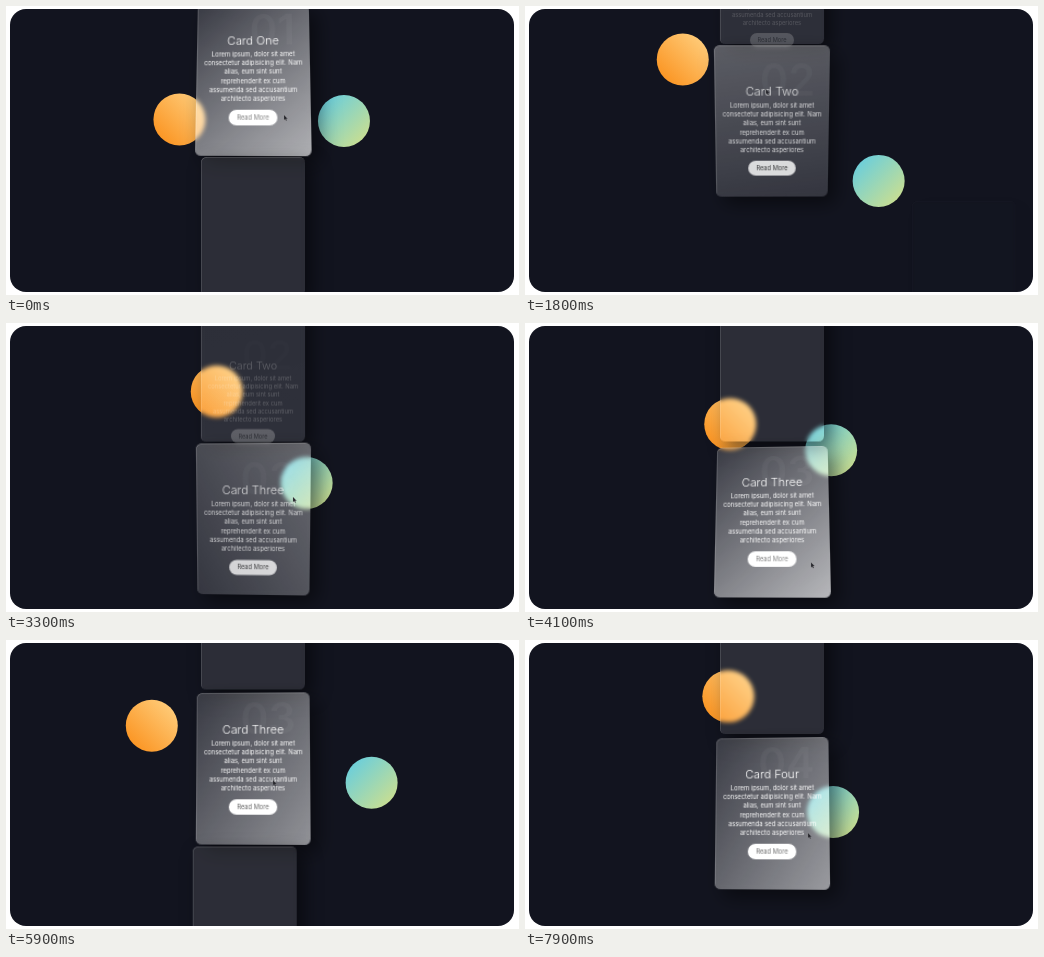
These frames come from a looping animation (513x289 px, 8 s). An HTML page:

```html
<!DOCTYPE html>
<html lang="en">
<head>
<meta charset="utf-8">
<title>Glass cards</title>
<style>
html, body { margin: 0; width: 100%; height: 100%; overflow: hidden; background: #12141f; }
#world { position: absolute; left: 0; top: 0; width: 513px; height: 289px; overflow: hidden; background: #12141f; }
#frame {
  position: absolute; left: 3.6px; top: 2.6px; width: 504.8px; height: 283.8px;
  border-radius: 16px; box-shadow: 0 0 0 40px #fff;
}
.ball { position: absolute; left: -26px; top: -26px; width: 52px; height: 52px; border-radius: 50%; }
#orange { background: linear-gradient(45deg, #fb9726 15%, #ffd080 95%); }
#green { background: linear-gradient(135deg, #6fcfd8 15%, #c8de92 88%); }
.card {
  position: absolute; left: 194.5px; top: -69px; width: 104px; height: 139px;
  border-radius: 5.5px; background: rgba(255, 255, 255, .11);
  box-shadow: 7px 7px 18px rgba(0, 0, 0, .5), inset .5px .5px 0 rgba(255, 255, 255, .25);
  backdrop-filter: blur(2px);
  font-family: Inter, "Open Sans", sans-serif; color: #fff; text-align: center;
}
.content, .glare { position: absolute; inset: 0; border-radius: 5.5px; }
.content > * { position: absolute; left: -10px; right: -10px; margin: 0; white-space: nowrap; }
.content .num {
  top: 2px; left: auto; right: 13px;
  font-size: 39px; line-height: 44px; font-weight: 600; color: rgba(255, 255, 255, .04);
}
h3 { top: 25.7px; font-size: 10.8px; line-height: 18px; font-weight: 350; }
p { top: 42.6px; font-size: 5.85px; line-height: 8.35px; }
.content .btn {
  top: 97.5px; left: 30.2px; right: 30.2px; height: 14.4px; border-radius: 8px;
  background: #fff; color: #222; font-size: 5.7px; line-height: 14.4px;
}
.glare { overflow: hidden; }
.glare i {
  position: absolute; left: -52px; top: -35px; width: 208px; height: 208px;
  background: linear-gradient(0deg, rgba(255, 255, 255, 0), #fff);
}
#mouse { position: absolute; left: 0; top: 0; width: 5px; height: 7px; overflow: visible; }
</style>
</head>
<body>
<div id="world">
  <div class="ball" id="orange"></div>
  <div class="ball" id="green"></div>
  <svg id="mouse" viewBox="0 0 5 7"><path d="M0 0V5L1.2 4 2 5.8 2.9 5.4 2.1 3.7H3.6Z" fill="#26262c" stroke="#888" stroke-width=".2"/></svg>
  <div id="frame"></div>
</div>
<script>
const LOOP = 8000, PITCH = 148;
const HELD = [36, 38, 43, 46, 50, 53, 72]; // steps that repeat the one before
const world = document.getElementById('world');
const orange = document.getElementById('orange');
const green = document.getElementById('green');
const mouse = document.getElementById('mouse');

// [time, y of the second card's centre]
const SCROLL = [[1300, 220], [1750, 116], [2800, 116], [3200, 48.5], [5400, 48.5], [5800, -20.5], [6450, -20.5], [6950, -124]];
// [time, x], [time, y] of the pointer
const MOUSE_X = [[0, 279], [1000, 238], [1300, 238], [2400, 247], [2900, 284], [3300, 288], [4900, 286], [5300, 284], [5900, 268], [6900, 270], [7900, 284]];
const MOUSE_Y = [[0, 110], [1000, 106], [1500, 104], [2200, 54], [2450, 54], [2950, 166], [3300, 175], [4400, 255], [5100, 256], [5700, 141], [6800, 145], [7800, 194]];

// hovered between from and to; side and slide describe the entrance
const CARDS = [
  { name: 'One', from: -1e4, to: 1550 },
  { name: 'Two', from: 1550, to: 3070 },
  { name: 'Three', from: 3070, to: 6700, side: 1, slide: [1650, 1235] },
  { name: 'Four', from: 6700, to: 1e5, side: -1, slide: [5400, 570] }
];

const clamp = (v, lo = 0, hi = 1) => Math.min(hi, Math.max(lo, v));
const smooth = u => (u = clamp(u), u * u * (3 - 2 * u));
const easeOut = (u, power) => 1 - (1 - clamp(u)) ** power;

function track(keys, t) {
  let [t0, v0] = keys[0];
  for (const [t1, v1] of keys) {
    if (t < t1) return v0 + (v1 - v0) * smooth((t - t0) / (t1 - t0));
    [t0, v0] = [t1, v1];
  }
  return v0;
}

CARDS.forEach((c, i) => {
  c.el = document.createElement('div');
  c.el.className = 'card';
  c.el.innerHTML = `<div class="content"><div class="num">0${i + 1}</div><h3>Card ${c.name}</h3>
    <p>Lorem ipsum, dolor sit amet<br>consectetur adipisicing elit. Nam<br>alias, eum sint sunt<br>reprehenderit ex cum<br>assumenda sed accusantium<br>architecto asperiores</p>
    <div class="btn">Read More</div></div><div class="glare"><i></i></div>`;
  c.content = c.el.querySelector('.content');
  c.glare = c.el.querySelector('i');
  world.insertBefore(c.el, mouse);
});

function place(el, x, y) {
  el.style.transform = `translate(${x}px, ${y}px)`;
}

function drawCard(c, i, t, mx, my) {
  const y = track(SCROLL, t) + (i - 1) * PITCH;
  const hover = (span, power) => easeOut((t - c.from) / span, power) - easeOut((t - c.to) / span, power);
  const lift = hover(400, 5), show = hover(500, 2.4);
  const shown = c.slide ? smooth((t - c.slide[0]) / c.slide[1]) : 1;
  const x = c.slide ? c.side * 200 * (1 - shown) : 0;
  const dx = clamp((mx - 246.5) / 57, -1, 1), dy = clamp((my - y) / 75, -1, 1);
  c.el.style.opacity = clamp(shown * 2);
  c.el.style.transform = `translate(${x}px, ${y}px) perspective(370px) ` +
    `rotateX(${14 * dy * lift}deg) rotateY(${-4 * dx * lift}deg) scale(${1 + .095 * lift})`;
  c.content.style.opacity = show;
  place(c.content, 0, 37 * (1 - show));
  c.glare.style.opacity = .9 * lift * (dy + 1) / 2;
  c.glare.style.transform = `rotate(${Math.atan2(mx - 246.5, y - my)}rad)`;
}

function draw(t) {
  const a = (9.5 + .073 * t) * Math.PI / 180;
  const bx = -76.7 - 33.7 * Math.sin(a), by = -34.3 + 34 * Math.cos(a);
  place(orange, 255.7 + bx, 114.2 + by);
  place(green, 255.7 - bx, 114.2 - by);
  const mx = track(MOUSE_X, t), my = track(MOUSE_Y, t);
  CARDS.forEach((c, i) => drawCard(c, i, t, mx, my));
  place(mouse, mx - 1, my - 1);
}

function tick() {
  let step = Math.floor(performance.now() % LOOP / 100);
  if (HELD.includes(step)) step--;
  draw(step * 100);
  requestAnimationFrame(tick);
}
tick();
</script>
</body>
</html>
```
